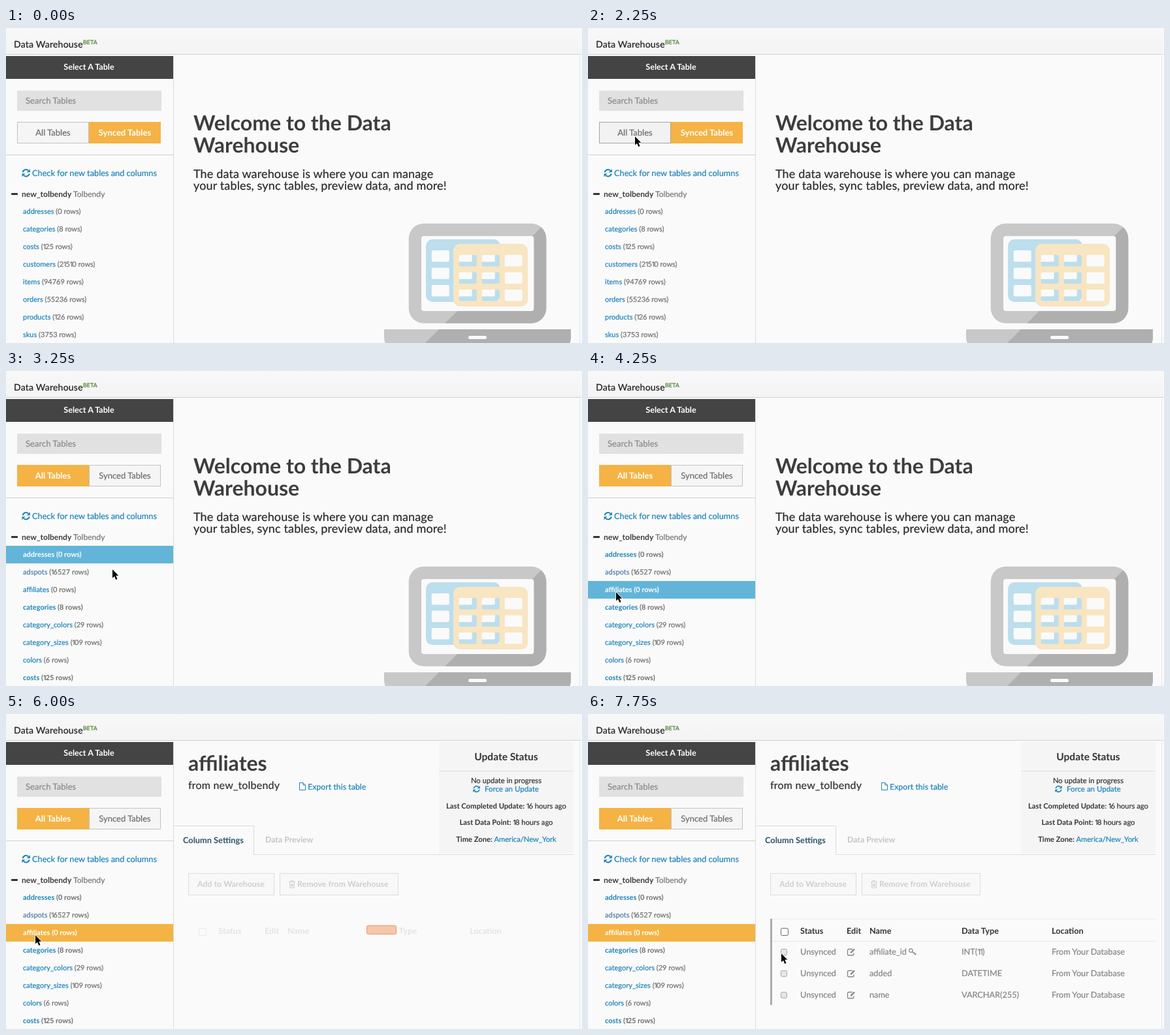
These frames come from a looping animation (882x483 px, 8 s). An HTML page:

```html
<!DOCTYPE html>
<html lang="en">
<head>
<meta charset="utf-8">
<title>Data Warehouse</title>
<style>
  html, body { margin: 0; width: 100%; height: 100%; overflow: hidden; background: #fafafa; }
  svg { display: block; }
  text {
    font-family: Lato, "Open Sans", sans-serif; white-space: pre; text-rendering: geometricPrecision;
    fill: currentColor; stroke: currentColor; stroke-width: .22px;
  }
  tspan { fill: currentColor; stroke: currentColor; }
  [font-weight="700"] { stroke-width: 0; }
  .one { font-family: Inter, sans-serif; font-size: .95em; letter-spacing: -.08em; }
</style>
</head>
<body>
<svg id="stage" width="882" height="483" viewBox="0 0 882 483"></svg>
<script>
const LOOP = 8000;
const INK = '#3d3d3f', GREY = '#6e6e6e', LINK = '#1d83ba', LINE = '#dcdcdc';
const GOLD = '#f4b344', SKY = '#62b5d8', PAPER = '#fafafa';

// Cursor tip: start time, x, y
const MOVES = [
  [750, 424, 219], [1000, 420, 224], [1250, 67, 171], [1500, 60, 172],
  [2000, 71, 165], [3000, 141, 209], [3250, 162, 303], [3500, 123, 337],
  [3750, 55, 337], [4000, 41, 338], [4250, 42, 338], [4750, 43, 338],
  [6000, 44, 338], [7000, 50, 338], [7250, 263, 327], [7500, 298, 350],
  [7750, 295, 366]
];

const SYNCED = [
  ['addresses', 0], ['categories', 8], ['costs', 125], ['customers', 21510],
  ['items', 94769], ['orders', 55236], ['products', 126], ['skus', 3753]
];
const ALL = [
  ['addresses', 0, 1], ['adspots', 16527], ['affiliates', 0], ['categories', 8, 1],
  ['category_colors', 29], ['category_sizes', 109], ['colors', 6], ['costs', 125, 1]
];

const rect = (x, y, w, h, fill, extra = '') =>
  `<rect x="${x}" y="${y}" width="${w}" height="${h}" fill="${fill}" ${extra}/>`;
const box = (x, y, w, h, fill, stroke, r = 0) =>
  rect(x + .5, y + .5, w - 1, h - 1, fill, `stroke="${stroke}" rx="${r}"`);
const text = (x, y, size, str, color = INK, weight = 400, extra = '') =>
  `<text x="${x}" y="${y}" font-size="${size}" color="${color}" font-weight="${weight}" ${extra}>${str}</text>`;
const mid = (x, y, size, str, color, weight) => text(x, y, size, str, color, weight, 'text-anchor="middle"');
const icon = (x, y, d, color, extra = '') =>
  `<path transform="translate(${x} ${y})" d="${d}" fill="none" stroke="${color}" ${extra}/>`;
const during = (on, off, body, extra = '') =>
  `<g data-on="${on}" data-off="${off}" ${extra}>${body}</g>`;
const ones = s => String(s).replace(/1/g, '<tspan class="one">1</tspan>');
const bold = s => `<tspan font-weight="700">${s}</tspan>`;
const tint = (s, color) => `<tspan color="${color}">${s}</tspan>`;

function refresh(x, y, scale) {
  const half = '<path d="M-5-1A5 5 0 0 1 3.6-3.6" fill="none" stroke="#1d83ba" stroke-width="2"/>' +
    '<path d="M6.2-6V-1H1.2Z" fill="#1d83ba"/>';
  return `<g transform="translate(${x} ${y}) scale(${scale})">${half}<g transform="rotate(180)">${half}</g></g>`;
}

// Sidebar
function row([name, count, strong], i, color) {
  const link = color || (name === 'adspots' ? '#4d7bab' : LINK);
  return text(26, 285 + i * 27, 11, `${tint(name, link)} (${ones(count)} rows)`,
    color || GREY, strong || color ? 700 : 400);
}
const list = rows => rows.map((r, i) => row(r, i)).join('');
const marked = (i, fill) => rect(0, 268 + i * 27, 256, 27, fill) + row(ALL[i], i, '#fff');

function tab(x, label, active, hover) {
  const shape = active ? rect(x, 144, 110, 33, GOLD)
    : box(x, 144, 110, 33, hover ? '#f2f2f2' : '#f5f5f5', hover ? '#a2a2a2' : '#c2c2c2');
  return shape + mid(x + 55, 165, 13, label, active ? '#fff' : GREY, active ? 700 : 400);
}
const tabs = (all, hover) => tab(17, 'All Tables', all, hover) + tab(127, 'Synced Tables', !all);

function sidebar() {
  return rect(256, 43, 1, 440, LINE) + rect(0, 43, 256, 35, '#444') +
    mid(127, 64, 12.6, 'Select A Table', '#fff', 700) +
    rect(17, 96, 221, 31, '#e1e1e1') + text(30, 116, 13.1, 'Search Tables', '#8a8a8a') +
    rect(0, 194, 256, 1, '#cfcfcf') +
    refresh(30.7, 222.3, 1) + text(40, 227, 12.75, 'Check for new tables and columns', LINK) +
    rect(8, 253, 10, 3, '#333', 'rx="1"') +
    text(24, 259, 12.1, bold('new_tolbendy') + tint(' Tolbendy', '#777')) +
    during(0, 2000, tabs(false)) + during(2000, 2500, tabs(false, true)) + during(2500, LOOP, tabs(true)) +
    during(0, 2500, list(SYNCED)) + during(2500, LOOP, list(ALL)) +
    during(3250, 3500, marked(0, SKY)) + during(3500, 4500, marked(2, SKY)) +
    during(4500, LOOP, marked(2, GOLD));
}

function header() {
  return '<linearGradient id="bar" x2="0" y2="1"><stop stop-color="#f8f8f8"/>' +
    '<stop offset="1" stop-color="#f4f4f4"/></linearGradient>' +
    rect(0, 0, 881, 40, 'url(#bar)') + rect(0, 40, 881, 1, '#cfcfcf') + rect(878, 43, 1, 440, '#e3e3e3') +
    text(12, 30, 14, 'Data Warehouse', '#2b2b2b', 500, 'letter-spacing=".2"') +
    text(118, 25, 9, 'BETA', '#47802f');
}

// Welcome screen
const round = (x, y, w, h, r) =>
  `M${x + r} ${y}h${w - 2 * r}a${r} ${r} 0 0 1 ${r} ${r}v${h - 2 * r}a${r} ${r} 0 0 1 ${-r} ${r}` +
  `h${2 * r - w}a${r} ${r} 0 0 1 ${-r} ${-r}v${2 * r - h}a${r} ${r} 0 0 1 ${r} ${-r}z`;

function sheet(x, y, fill) {
  let d = round(x, y, 114, 96, 10);
  for (let i = 0; i < 9; i++)
    d += round(x + 8.7 + i % 3 * 35, y + 17 + (i / 3 | 0) * 26.5, 27, 17.5, 2);
  return `<path d="${d}" fill="${fill}" fill-rule="evenodd"/>`;
}

function laptop() {
  const body = round(616.7, 299.7, 210.6, 153, 23) +
    'M579 462H865V474Q865 490 850 490H594Q579 490 579 474Z';
  return `<clipPath id="shade"><path d="M825 300H882V483H642Z"/></clipPath>` +
    `<path d="${body}" fill="#c8c8c8"/><path d="${body}" fill="#afafaf" clip-path="url(#shade)"/>` +
    rect(636, 319, 172.3, 115, PAPER, 'rx="4"') +
    sheet(643, 324, '#bcdeed') + sheet(685, 331, '#f8e5c2') +
    rect(708, 472, 28, 5, PAPER, 'rx="2.5"');
}

function welcome() {
  const gap = 'letter-spacing=".14"';
  return text(287, 156.7, 32, 'Welcome to the Data', INK, 700) + text(287, 190.7, 32, 'Warehouse', INK, 700) +
    text(287, 230, 18, 'The data warehouse is where you can manage', '#2b2b2b', 400, gap) +
    text(287, 248, 18, 'your tables, sync tables, preview data, and more!', '#2b2b2b', 400, gap) + laptop();
}

// Table page
function status() {
  const line = (y, label, value) => mid(766, y, 11.2, `${bold(label)} ${value}`, '#333');
  return rect(663, 43, 206, 170, '#f5f5f5') + rect(663, 87, 206, 1, '#e0e0e0') +
    mid(766, 71, 15.5, 'Update Status', '#333', 700) +
    mid(766, 106, 11.2, 'No update in progress', '#333') +
    refresh(720.5, 115, .85) + text(733, 119, 11.5, 'Force an Update', LINK) +
    line(145, 'Last Completed Update:', ones('16') + ' hours ago') +
    line(170, 'Last Data Point:', ones('18') + ' hours ago') +
    line(196, 'Time Zone:', tint('America/New_York', LINK));
}

function page(from, x) {
  return text(279, 87, 32, 'affiliates', INK, 700) +
    text(279, 115, 16, from, '#333', 400, 'letter-spacing=".2"') +
    icon(x - 13, 105, 'M.5.5H6L9.5 4V11.5H.5ZM6 .5V4H9.5', LINK) +
    text(x, 116, 12.4, 'Export this table', LINK) + status();
}

function settings() {
  const pale = '#cfcfcf';
  return rect(257, 171, 123, 1, LINE) + rect(379, 171, 1, 45, LINE) + rect(379, 215, 490, 1, LINE) +
    text(271, 198, 12.8, 'Column Settings', '#2b5468', 700) +
    text(397, 197, 12.3, 'Data Preview', '#c4c4c4', 700) +
    box(279, 244, 132, 34, '#f8f8f8', LINE) + text(293, 265, 12.4, 'Add to Warehouse', pale, 700) +
    box(419, 244, 182, 34, '#f8f8f8', LINE) + text(446, 265, 12.4, 'Remove from Warehouse', pale, 700) +
    icon(433, 255, 'M0 2.5H10M3 2V.5H7V2M1.5 3V11.5H8.5V3M3.5 5V10M5 5V10M6.5 5V10', pale);
}

const columns = () => box(295, 328, 12, 12, '#fff', '#666', 2) +
  [[325, 'Status'], [396, 'Edit'], [431, 'Name'], [572, 'Data Type'], [710, 'Location']]
    .map(([x, s]) => text(x, 337, 12.7, s, '#333', 700)).join('');

const loader = last => box(552, 324, 46, 14, '#f6c7ab', '#e79768', 2) +
  (last ? rect(583, 325, 14, 12, last) : '');

function columnRow([name, type], i) {
  const y = 369 + i * 33, grey = '#868686';
  return box(295, y - 9, 10, 10, '#e6e6e6', '#a8a8a8', 2) +
    text(325, y, 12.7, 'Unsynced', grey) +
    icon(397, y - 10, 'M8 1.5H2.5Q.5 1.5.5 3.5V9Q.5 11 2.5 11H8Q10 11 10 9V7.5M5 7.5L11 1.5', grey, 'stroke-width="1.3"') +
    icon(397, y - 10, 'M5.5 7L11 1.5', grey, 'stroke-width="2.4"') +
    text(431, y, 12.7, name, grey) + text(572, y, 12.7, ones(type), grey) +
    text(710, y, 12.7, 'From Your Database', grey);
}

function table() {
  const rows = [['affiliate_id', 'INT(11)'], ['added', 'DATETIME'], ['name', 'VARCHAR(255)']];
  return rect(279, 314, 3, 132, '#ababab') + rect(282, 314, 587, 1, '#ebebeb') +
    rect(282, 348, 587, 1, '#e4e4e4') + columns() + rows.map(columnRow).join('') +
    icon(491, 359, 'M3.5 1A2.7 2.7 0 1 1 3.4 1M5.5 5.5L11 10.5M8 8L9.5 6.5M10 9.8L11.5 8.3', '#868686', 'stroke-width="1.3"');
}

const stage = document.getElementById('stage');
stage.innerHTML = rect(0, 0, 882, 483, PAPER) + header() + sidebar() +
  during(0, 4500, welcome()) +
  during(4500, 6000, page('from', 355), 'transform="translate(-1)"') +
  during(6000, LOOP, page('from new_tolbendy', 462) + settings()) +
  during(6000, 6500, `<g opacity=".11">${columns()}</g>`) +
  during(6000, 6250, loader()) + during(6250, 6500, loader('#fae0d0')) +
  during(6500, LOOP, table()) +
  during(750, LOOP, '<path d="M1 1.2V14.4L4 11.7L6.3 16.9L8.5 15.9L6.3 10.8H10.3Z" fill="#000" stroke="#fff" ' +
    'stroke-width="1.6" paint-order="stroke" stroke-linejoin="round"/>', 'id="cursor"');

const timed = [...stage.querySelectorAll('[data-on]')];
const cursor = document.getElementById('cursor');
const start = performance.now();

function draw(t) {
  for (const g of timed)
    g.style.display = t >= +g.dataset.on && t < +g.dataset.off ? '' : 'none';
  const move = MOVES.filter(m => m[0] <= t).pop();
  if (move) cursor.setAttribute('transform', `translate(${move[1]} ${move[2]})`);
}

function tick(now) {
  draw(Math.max(0, now - start) % LOOP);
  requestAnimationFrame(tick);
}
draw(0);
requestAnimationFrame(tick);
</script>
</body>
</html>
```
